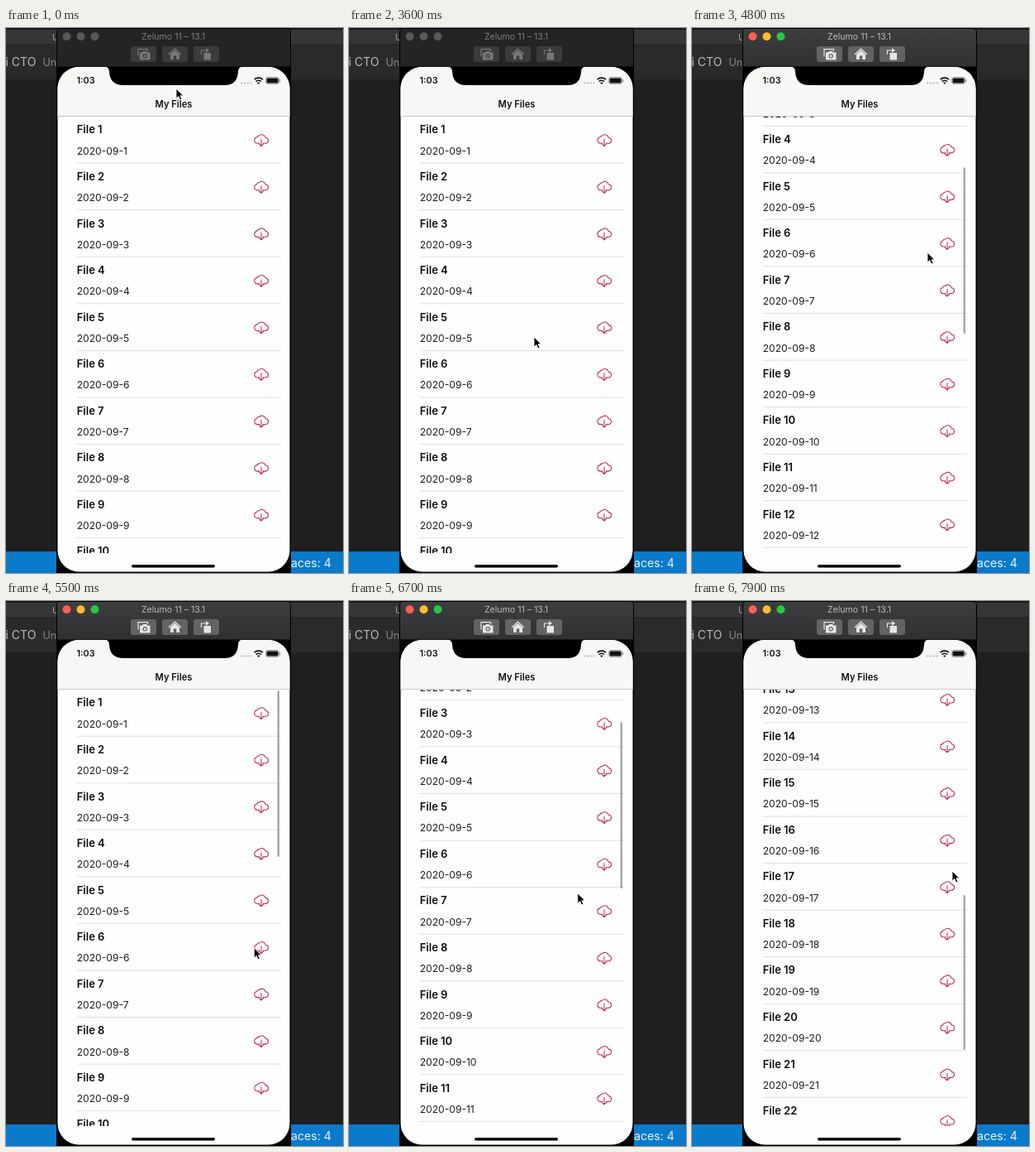
Write an HTML page that moves like this. It is 408 px wide and 658 px high and loops after 8 s.

```html
<!DOCTYPE html>
<html lang="en">
<head>
<meta charset="utf-8">
<title>My Files</title>
<style>
  html, body { margin: 0; width: 100%; height: 100%; overflow: hidden; background: #1f1f20; }
  svg { display: block; width: 408px; height: 658px; font-family: Inter, "Liberation Sans", sans-serif; }
  .name { font-size: 13px; font-weight: 600; fill: #0b0b0b; }
  .date { font-size: 12.1px; fill: #1c1c1c; }
  .icon { fill: none; stroke: #c0284a; stroke-width: 1.05; stroke-linecap: round; stroke-linejoin: round; }
  .rule { stroke: #dedee0; stroke-width: 1; }
  .bar { fill: #232426; }
  .light { fill: #58595b; }
  .caption { font-size: 10.6px; fill: #7b7c7e; text-anchor: middle; }
  .button { fill: #3a3b3d; }
  .glyph { fill: #77787a; stroke: #77787a; }
  .hole { fill: #3a3b3d; stroke: none; }
  .active .bar { fill: url(#chrome); }
  .active .caption { fill: #b9babb; }
  .active .button, .active .hole { fill: #626365; }
  .active .glyph { fill: #e6e6e6; stroke: #e6e6e6; }
  .active .red { fill: #ff5f57; }
  .active .yellow { fill: #febc2e; }
  .active .green { fill: #28c840; }
</style>
</head>
<body>
<svg viewBox="0 0 408 658">
  <defs>
    <linearGradient id="chrome" x2="0" y2="1">
      <stop stop-color="#3d3e40"/><stop offset="1" stop-color="#2f3032"/>
    </linearGradient>
    <clipPath id="screen"><rect x="62.5" y="47" width="281" height="609.5" rx="26"/></clipPath>
    <clipPath id="view"><rect x="62" y="107" width="282" height="527"/></clipPath>
    <path id="cloud" class="icon" d="M-2.2 4.2H-4.6A3.6 3.6 0 0 1-5.4-2.9A2.7 2.7 0 0 1-2.7-4.8A4.7 4.7 0 0 1 5.2-2.6A3.4 3.4 0 0 1 5 4.2H2.2M0-1V7.6M-2.7 5L0 7.7L2.7 5"/>
    <path id="share" class="icon" d="M-2.4-2.8H-5.6V7.6H5.6V-2.8H2.4M0 3V-7.8M-2.8-5L0-7.8L2.8-5"/>
  </defs>

  <!-- editor behind -->
  <rect width="408" height="658" fill="#1f1f20"/>
  <rect width="408" height="62" fill="#2a2a2b"/>
  <rect width="408" height="20" fill="#353638"/>
  <rect width="408" height="2" fill="#191a1b"/>
  <rect y="19.5" width="408" height="1" fill="#202122"/>
  <text x="56" y="14.5" font-size="10.5" fill="#a4a5a6">U</text>
  <text x="-.5" y="46" font-size="14" fill="#b9babb">i CTO</text>
  <text x="44.5" y="46" font-size="12.5" fill="#858688">Unt</text>
  <rect y="632" width="408" height="26" fill="#0a7acb"/>
  <text x="394" y="651" font-size="14.2" text-anchor="end" fill="#e9f3fb">Spaces: 4</text>

  <!-- simulator window -->
  <g id="win">
    <path d="M61 658V5a5 5 0 0 1 5-5H340a5 5 0 0 1 5 5V658Z" fill="#000"/>
    <path class="bar" d="M62 46.5V5a4 4 0 0 1 4-4H340a4 4 0 0 1 4 4V46.5Z"/>
    <circle class="light red" cx="73.5" cy="10.3" r="5"/>
    <circle class="light yellow" cx="90.5" cy="10.3" r="5"/>
    <circle class="light green" cx="107.5" cy="10.3" r="5"/>
    <text class="caption" x="202.5" y="14.2">Zelumo 11 – 13.1</text>
    <rect class="button" x="151" y="22" width="31" height="19" rx="3"/>
    <rect class="button" x="189" y="22" width="31" height="19" rx="3"/>
    <rect class="button" x="227" y="22" width="31" height="19" rx="3"/>
    <g class="glyph" stroke-width="1.2">
      <path fill="none" d="M160 34.5V25.6H171.5V28"/>
      <path stroke="none" d="M162 29.5H165L166 28H170L171 29.5H174.5V38.5H162Z"/>
      <circle class="hole" cx="168.2" cy="33.8" r="2.7"/>
      <circle stroke="none" cx="168.2" cy="33.8" r="1.5"/>
      <path fill="none" d="M197 32L204.5 25L212 32"/>
      <path stroke="none" d="M199 31.8L204.5 26.7L210 31.8V38H206.2V33.5H202.8V38H199Z"/>
      <path stroke="none" d="M239.5 30H248V38.5H239.5Z"/>
      <path fill="none" d="M236.5 32V27H243"/>
      <path stroke="none" d="M242 24L246 27L242 30Z"/>
    </g>
  </g>

  <!-- phone screen -->
  <g clip-path="url(#screen)">
    <rect x="62" y="46" width="282" height="612" fill="#fefefe"/>
    <g clip-path="url(#view)">
      <g id="list"></g>
      <rect id="thumb" x="328.6" width="2.3" rx="1.15" fill="#a2a2a4"/>
    </g>
    <rect x="62" y="46" width="282" height="60.5" fill="#f7f7f6"/>
    <path d="M62 106.5H344" stroke="#c9c9c9"/>
    <path d="M120 46.5Q125 47.5 125 53Q126 69 142 69H265Q280 69 281 53Q281 47.5 286 46.5Z" fill="#000"/>
    <text x="85.5" y="67.3" font-size="10.8" font-weight="600" fill="#111">1:03</text>
    <g fill="#b4b4b4">
      <circle cx="285.2" cy="66.5" r="1.1"/><circle cx="289" cy="66.5" r="1.1"/>
      <circle cx="292.8" cy="66.5" r="1.1"/><circle cx="296.6" cy="66.5" r="1.1"/>
    </g>
    <g fill="none" stroke="#111" stroke-width="1.6">
      <path d="M300.6 62.3A7.2 7.2 0 0 1 311 62.3M302.6 64.6A4.5 4.5 0 0 1 309 64.6"/>
      <path d="M305.8 68L304 66Q305.8 64.8 307.6 66Z" fill="#111" stroke="none"/>
    </g>
    <rect x="314.5" y="59.5" width="16" height="8" rx="2.2" fill="none" stroke="#8c8c8c" stroke-width=".8"/>
    <rect x="315.5" y="60.5" width="14" height="6" rx="1.3" fill="#111"/>
    <path d="M331.6 62V65.2" stroke="#8c8c8c" stroke-width="1.1"/>
    <text x="203" y="95.6" font-size="11.2" font-weight="600" text-anchor="middle" fill="#111">My Files</text>
    <rect x="152" y="648" width="101" height="3.6" rx="1.8" fill="#000"/>
  </g>

  <path id="cursor" d="M0 0V12.2L2.8 9.6L4.8 14L7 13L5 8.8H8.8Z" fill="#000" stroke="#fff" stroke-width=".9"/>
</svg>

<script>
const LOOP = 8000, STEP = 100, PITCH = 56.56, TOP = 106.6, VIEW = 526;
const $ = id => document.getElementById(id);

// [time, value, ...]
const pointer = [
  [0, 206, 73], [900, 209, 236], [1300, 207, 287], [1800, 131, 467], [2250, 215, 381],
  [2700, 131, 467], [3000, 212, 388], [3200, 212, 388], [3600, 224, 373], [4100, 284, 429],
  [4800, 285, 271], [5000, 286, 267], [5450, 300, 429], [5850, 309, 193], [6450, 319, 429],
  [6500, 319, 427], [6800, 262, 327], [7100, 243, 327], [7450, 300, 430], [7750, 315, 326], [8000, 315, 326]
];
const scroll = [
  [0, 0], [4100, 0], [4800, 158], [5000, 162], [5450, 0], [6450, 0],
  [6500, 1], [6800, 150], [7100, 300], [7450, 390], [7900, 695], [8000, 730]
];
const fade = [[0, 0], [4050, 0], [4150, 1], [5850, 1], [6100, 0], [6400, 0], [6500, 1], [8000, 1]];

const ease = p => p * p * (3 - 2 * p);
const linear = p => p;

function sample(table, t, curve) {
  const i = Math.max(1, table.findIndex(k => k[0] >= t));
  const a = table[i - 1], b = table[i];
  const p = curve((t - a[0]) / (b[0] - a[0]));
  return a.slice(1).map((v, j) => v + (b[j + 1] - v) * p);
}

function row(n) {
  const y = TOP + (n - 1) * PITCH;
  const icon = (id, x, extra = "") => `<use href="#${id}" x="${x}" y="${y + 28.4}" ${extra}/>`;
  const icons = n === 2
    ? `<g id="idle">${icon("cloud", 309)}</g><g id="done">${icon("cloud", 282)}${icon("share", 309)}</g>`
    : icon("cloud", 309);
  return `<text class="name" x="85.7" y="${y + 20.8}">File ${n}</text>
    <text class="date" x="85.7" y="${y + 46}">2020-09-${n}</text>
    <path class="rule" d="M86 ${y + PITCH}H333"/>${icons}`;
}
$("list").innerHTML = Array.from({ length: 26 }, (_, i) => row(i + 1)).join("");

function draw(t) {
  const [x, y] = sample(pointer, t, ease);
  const [offset] = sample(scroll, t, linear);
  const [alpha] = sample(fade, t, linear);
  const ratio = VIEW / (t < 7500 ? 1377 : 1480);
  const done = t >= 5900;

  $("win").classList.toggle("active", t >= 3900);
  $("idle").style.display = done ? "none" : "";
  $("done").style.display = done ? "" : "none";
  $("list").setAttribute("transform", `translate(0 ${-offset})`);
  $("thumb").setAttribute("y", 108 + offset * ratio);
  $("thumb").setAttribute("height", VIEW * ratio);
  $("thumb").setAttribute("opacity", alpha);
  $("cursor").setAttribute("transform", `translate(${x} ${y})`);
}

const start = performance.now();
function tick() {
  const t = (performance.now() - start) % LOOP;
  draw(Math.floor(t / STEP) * STEP);
  requestAnimationFrame(tick);
}
tick();
</script>
</body>
</html>
```
